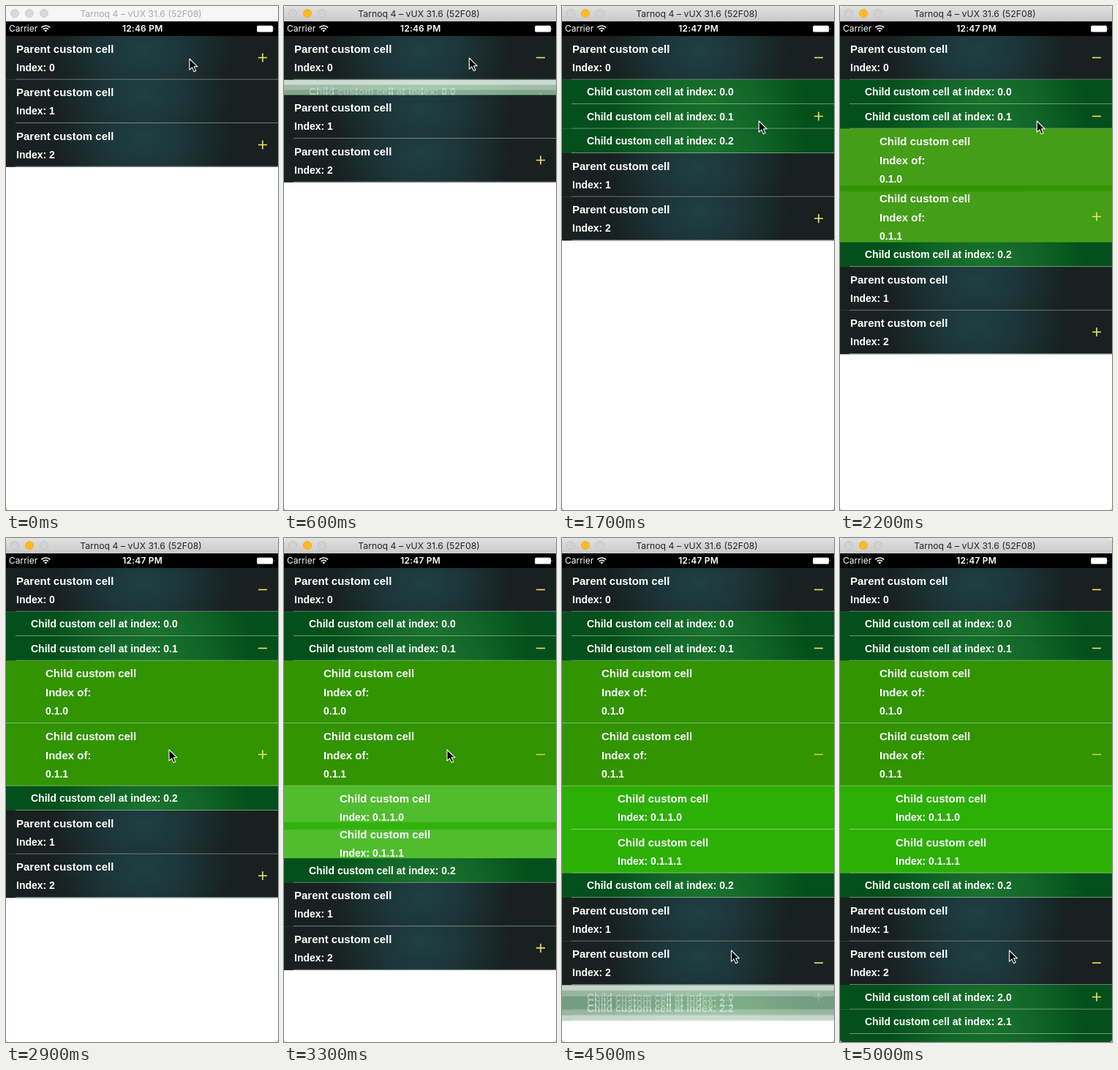
These frames come from a looping animation (372 px wide and 688 px high, 5.1 s). An HTML page:

```html
<!DOCTYPE html>
<html lang="en">
<head>
<meta charset="utf-8">
<title>Expandable cells</title>
<style>
  html, body { margin: 0; width: 100%; height: 100%; overflow: hidden; background: #fff; }
  svg { display: block; width: 372px; height: 688px; }
  .cell { font-family: "Liberation Sans", Arial, sans-serif; font-weight: 700; fill: #fff; }
  .bar { font-family: Inter, Roboto, sans-serif; }
</style>
</head>
<body>
<svg id="stage" viewBox="0 0 372 688" xmlns="http://www.w3.org/2000/svg">
  <defs>
    <linearGradient id="active" x2="0" y2="1">
      <stop offset="0" stop-color="#e0e0e0"/><stop offset="1" stop-color="#cacaca"/>
    </linearGradient>
    <radialGradient id="teal" gradientUnits="userSpaceOnUse" cx="0" cy="0" r="1"
        gradientTransform="translate(188 20) scale(122 90)">
      <stop offset="0" stop-color="#1f4044"/><stop offset=".5" stop-color="#1c3437"/>
      <stop offset="1" stop-color="#182120"/>
    </radialGradient>
    <radialGradient id="forest" gradientUnits="userSpaceOnUse" cx="0" cy="0" r="1"
        gradientTransform="translate(200 26) scale(135 76)">
      <stop offset="0" stop-color="#1b742e"/><stop offset=".5" stop-color="#126628"/>
      <stop offset="1" stop-color="#04501c"/>
    </radialGradient>
  </defs>
  <rect width="372" height="688" fill="#fff"/>
  <g id="table" class="cell"></g>

  <rect id="titleBar" width="372" height="21"/>
  <g id="lights" stroke-width=".8">
    <circle cx="12" cy="10" r="5.6"/><circle cx="32" cy="10" r="5.6"/><circle cx="52" cy="10" r="5.6"/>
  </g>
  <text id="title" class="bar" x="184.5" y="15" font-size="12.3" text-anchor="middle">Tarnoq 4 – vUX 31.6 (52F08)</text>

  <rect y="21" width="372" height="20" fill="#000"/>
  <g class="bar" fill="#fff" font-size="12">
    <text x="4" y="35.3">Carrier</text>
    <text id="clock" x="186.7" y="35.3" text-anchor="middle" font-weight="600" letter-spacing=".2"></text>
  </g>
  <g fill="none" stroke="#fff" stroke-width="1.7">
    <path d="M48.4 29.4A8.5 8.5 0 0 1 60.2 29.4"/>
    <path d="M50.7 31.8A5.2 5.2 0 0 1 57.9 31.8"/>
    <path d="M52.2 33.2Q54.3 31.6 56.4 33.2L54.3 35.6Z" fill="#fff" stroke="none"/>
  </g>
  <rect x="343.2" y="26.7" width="21.8" height="8.8" rx="1.6" fill="#fff"/>
  <path d="M365.8 29.5q1.6 1.6 0 3.2z" fill="#fff"/>

  <g fill="#c4c4c4">
    <path d="M0 0H4A4 4 0 0 0 0 4ZM372 0H368A4 4 0 0 1 372 4Z" fill="#fff"/>
    <path d="M0 688V684A4 4 0 0 0 4 688ZM372 688V684A4 4 0 0 1 368 688Z"/>
  </g>
  <path id="cursor" d="M0 0V15.2L3.6 11.9L6.1 17.6L8.7 16.4L6.2 10.8H11Z"
        fill="#000" stroke="#fff" stroke-width="1.1" stroke-linejoin="round"/>
</svg>
<script>
const NS = "http://www.w3.org/2000/svg";
const $ = id => document.getElementById(id);
const LOOP = 5100, STEP = 100, SLIDE = 300;

function add(parent, tag, attrs, text) {
  const el = document.createElementNS(NS, tag);
  for (const k in attrs) el.setAttribute(k, attrs[k]);
  if (text) el.textContent = text;
  return parent.appendChild(el);
}

// Row styles by depth; each line is [baseline, font size].
const LEVELS = [
  { h: 59.5, x: 14, fill: "url(#teal)", lines: [[22.5, 15], [47.8, 14]],
    text: i => ["Parent custom cell", "Index: " + i] },
  { h: 33.5, x: 34, fill: "url(#forest)", lines: [[21.5, 14]],
    text: i => ["Child custom cell at index: " + i] },
  { h: 85.5, x: 54, fill: "#319400", lines: [[22.5, 15], [48.5, 15], [73.8, 14]],
    text: i => ["Child custom cell", "Index of:", i] },
  { h: 59.5, x: 76, fill: "#2cb005", lines: [[22.5, 15], [47.5, 14]],
    text: i => ["Child custom cell", "Index: " + i] }
];

// Index of each expandable row: number of children and opening time.
const OPENS = {
  "0": [3, 505], "0.1": [2, 1964], "0.1.1": [2, 3086], "2": [3, 4400], "2.0": [0, Infinity]
};

function makeRow(id, depth) {
  const lv = LEVELS[depth], g = add($("table"), "g", {});
  add(g, "rect", { width: 372, height: lv.h + .3, fill: lv.fill });
  lv.text(id).forEach((s, n) =>
    add(g, "text", { x: lv.x, y: lv.lines[n][0], "font-size": lv.lines[n][1] }, s));
  const left = depth === 2 ? 0 : 13;
  add(g, "rect", { x: left, y: lv.h - .8, width: 372 - left, height: .9, fill: "#fff", opacity: .5 });

  const row = { g, h: lv.h, depth, opensAt: Infinity, kids: [] };
  const open = OPENS[id];
  if (open) {
    row.icon = add(g, "path", { stroke: "#f4e262", "stroke-width": 1.6, fill: "none" });
    row.opensAt = open[1];
    for (let i = 0; i < open[0]; i++) row.kids.push(makeRow(id + "." + i, depth + 1));
  }
  return row;
}
const roots = [0, 1, 2].map(i => makeRow(String(i), 0));

const clamp = v => Math.min(1, Math.max(0, v));

// cubic-bezier(.42, 0, .58, 1)
function ease(p) {
  let lo = 0, hi = 1;
  for (let i = 0; i < 20; i++) {
    const u = (lo + hi) / 2, v = 1 - u;
    if (1.26 * u * v * v + 1.74 * u * u * v + u * u * u < p) lo = u; else hi = u;
  }
  return p <= 0 ? 0 : p >= 1 ? 1 : lo * lo * (3 - 2 * lo);
}

// Places rows from y downward, unfolded by e, and returns their total height.
function place(rows, y, e, t) {
  let used = 0;
  for (const r of rows) {
    const top = y + used * e;
    r.g.setAttribute("transform", `translate(0 ${top.toFixed(2)})`);
    r.g.setAttribute("opacity", e.toFixed(3));
    if (r.icon) {
      const m = r.h / 2 - .25, open = t >= r.opensAt;
      r.icon.setAttribute("d", `M345 ${m}h12` + (open ? "" : `M351 ${m - 6}v12`));
      r.icon.setAttribute("opacity", open && r.depth === 2 ? .8 : 1);
    }
    used += r.h + place(r.kids, top + r.h, ease(clamp((t - r.opensAt) / SLIDE)), t);
  }
  return used * e;
}

// Pointer moves: [start, end, x, y]
const MOVES = [
  [100, 400, 253.3, 71], [900, 1500, 269.3, 157], [2400, 2900, 223, 289],
  [3400, 3850, 238.5, 511], [3950, 4300, 231.5, 563]
];
function pointer(t) {
  let x = 251, y = 72;
  for (const [a, b, tx, ty] of MOVES) {
    const e = ease(clamp((t - a) / (b - a)));
    x += (tx - x) * e;
    y += (ty - y) * e;
  }
  return `translate(${x.toFixed(1)} ${y.toFixed(1)})`;
}

function drawWindow(on) {
  $("titleBar").setAttribute("fill", on ? "url(#active)" : "#f6f6f6");
  $("title").setAttribute("fill", on ? "#262626" : "#a9a9a9");
  [...$("lights").children].forEach((c, i) => {
    const amber = on && i === 1;
    c.setAttribute("fill", amber ? "#fdb924" : on ? "#d2d2d2" : "#d9d9d9");
    c.setAttribute("stroke", amber ? "#f0ad20" : on ? "#bebebe" : "#c9c9c9");
  });
}

function render(t) {
  drawWindow(t >= 300);
  $("clock").textContent = t < 1200 ? "12:46 PM" : "12:47 PM";
  place(roots, 41, 1, t);
  $("cursor").setAttribute("transform", pointer(t));
}

const start = performance.now();
function tick() {
  const t = (performance.now() - start) % LOOP;
  render(Math.floor(t / STEP) * STEP);
  requestAnimationFrame(tick);
}
render(0);
requestAnimationFrame(tick);
</script>
</body>
</html>
```
